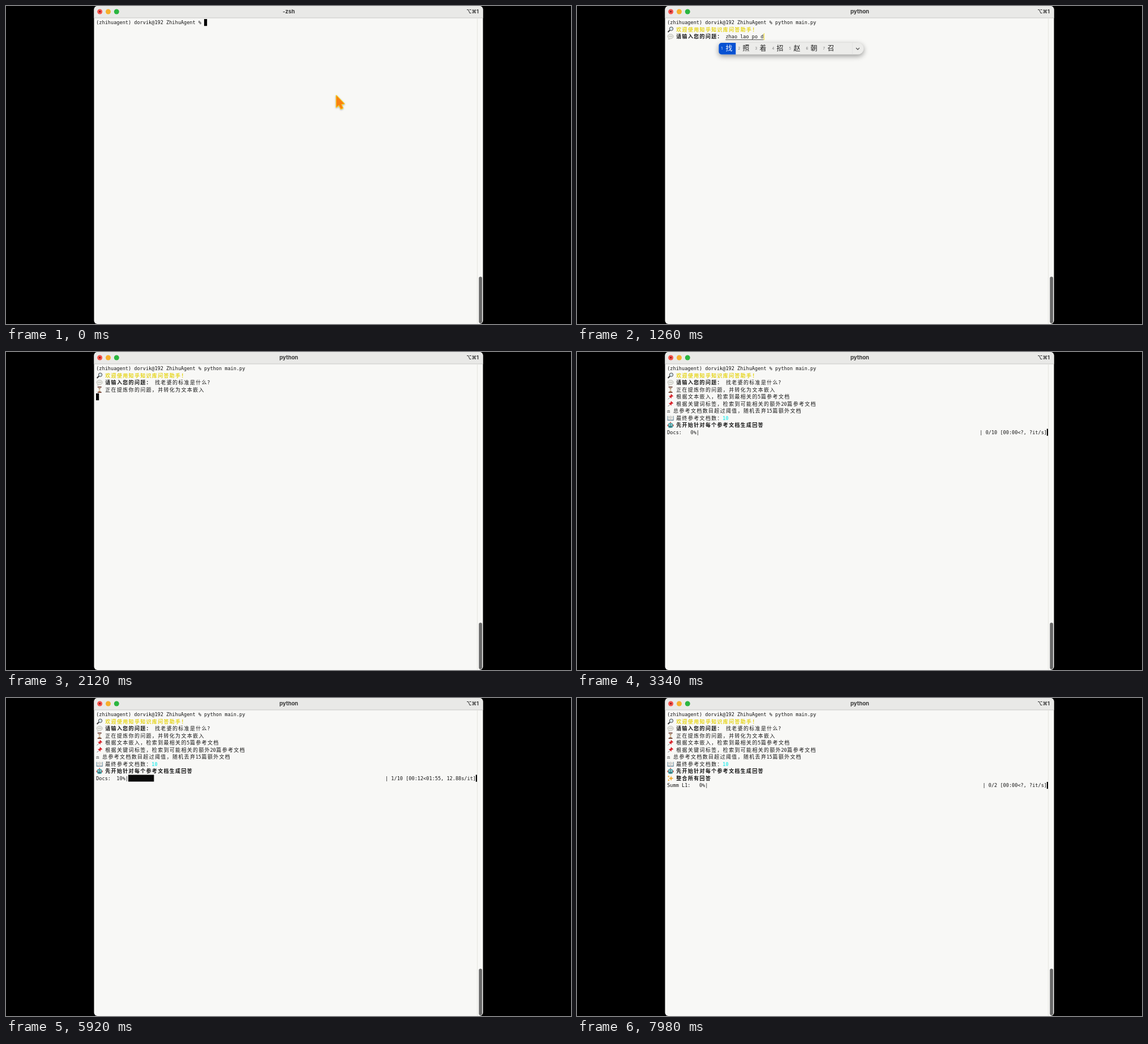
Write an HTML page with a canvas that moves like this. It is 998x561 px and loops after 8000 ms.

```html
<!DOCTYPE html>
<html lang="zh-CN">
<head>
<meta charset="utf-8">
<title>Terminal</title>
<style>
html, body { margin: 0; width: 100%; height: 100%; overflow: hidden; background: #000; }
canvas { display: block; }
</style>
</head>
<body>
<canvas id="stage" width="998" height="561"></canvas>
<script>
const ctx = document.getElementById('stage').getContext('2d');
const LOOP = 8000, LEFT = 159.2, CELL = 5.16, TOP = 29, ROW = 12.5, COLS = 130;
const MONO = '"DejaVu Sans Mono", monospace';
const CJK = '"Noto Sans CJK SC", "Noto Sans CJK", sans-serif';
const UI = 'Inter, "DejaVu Sans", sans-serif';
const INK = '#151515';

// Small pictures in an 11 x 11 box: colour, path, optional stroke width
const icons = {
  search: [['#333', 'M1 10L4.6 6.4', 2], ['#d5e5ec', 'M3.6 4.2a3.2 3.2 0 1 0 6.4 0a3.2 3.2 0 1 0-6.4 0'],
    ['#444', 'M3.6 4.2a3.2 3.2 0 1 0 6.4 0a3.2 3.2 0 1 0-6.4 0', 1]],
  bubble: [['#e9e9e4', 'M.6 5a5 4 0 1 1 5 4.1L2 10.4L2.4 8A4 4 0 0 1 .6 5'],
    ['#aaa99f', 'M.6 5a5 4 0 1 1 5 4.1L2 10.4L2.4 8A4 4 0 0 1 .6 5', .7], ['#8b8b86', 'M3 5h1M5.2 5h1M7.4 5h1', 1]],
  hourglass: [['#d9d4cc', 'M2.8 1h5.4C8.2 4 6.2 4.5 6.2 5.5S8.2 7 8.2 10H2.8C2.8 7 4.8 6.500 4.8 5.5S2.8 4 2.8 1'],
    ['#b98a55', 'M3.4 3h4.2L5.5 5.200zM3 9.800L5.5 7L8 9.800z'], ['#693329', 'M2 .8h7M2 10.2h7', 1.5]],
  pin: [['#777', 'M1 10L4.500 6.500', 1], ['#d8232b', 'M6.500 .4L10.600 4.400L9.500 5L8.300 5L7 6.700L7 8.800L2.200 4.100L4.300 4L6 2.700L5.900 1.400z']],
  book: [['#47708d', 'M0 1.800h11v8H0z'], ['#f1f0ea', 'M.8 1.200Q4 .6 5.500 2Q7 .6 10.200 1.200v7.500Q7 8 5.500 9.200Q4 8 .8 8.700z'],
    ['#8a8f92', 'M5.500 2v7M2 3.500h2.300M2 5.300h2.300M6.800 3.500h2.300M6.800 5.300h2.300', .6]],
  robot: [['#d44b45', 'M0 4.500h11v3H0zM4.600 0h1.800v2H4.600z'], ['#4ba0a5', 'M1.300 4Q1.500 1.800 5.500 1.800T9.700 4v4Q9.500 10.500 5.500 10.500T1.300 8z'],
    ['#e9f0ee', 'M2.800 4.300h1.700v1.700H2.800zM6.500 4.300h1.700v1.700H6.500z'], ['#294f55', 'M3.300 8.200h4.400', 1]],
  sparkles: [['#f3ac32', 'M6.500 1L7.600 4.500L11 5.800L7.600 7L6.500 10.500L5.400 7L2 5.800L5.400 4.500zM2.200 .3L2.800 1.800L4.300 2.400L2.800 3L2.200 4.500L1.600 3L.1 2.400L1.600 1.800zM2.200 7.200L3.700 9L2.200 10.800L.7 9z']],
};

// Lines printed below the question: time, icon, column, text, weight
const output = [
  [2020, 'hourglass', 3, '正在提炼你的问题，并转化为文本嵌入'],
  [2600, 'pin', 3, '根据文本嵌入，检索到最相关的5篇参考文档'],
  [2900, 'pin', 3, '根据关键词标签，检索到可能相关的额外20篇参考文档'],
  [2900, '', 0, '⚖ 总参考文档数目超过阈值，随机丢弃15篇额外文档'],
  [2900, 'book', 3, '最终参考文档数：'],
  [2900, 'robot', 3, '先开始针对每个参考文档生成回答', 'bold'],
  [7560, 'sparkles', 3, '整合所有回答', 'bold'],
];

// Input method phrases: first key, commit, spelling, result, candidates while typing, last candidates
const phrases = [
  [960, 1310, 'zhao lao po de', '找老婆的', '找 照 着 招 赵 朝 召', '找老婆的 找老婆 找老 找 照 着'],
  [1330, 1600, 'biao zhun', '标准', '标注 标柱 表注 表 标 飙 彪', '标准 表准 表 标 飙 彪'],
  [1660, 1940, 'shi shen me', '是什么', '是 时 事 使 市 十 式', '是什么 什么 是 时 事 使'],
];
const KEY = 25;

const colX = col => LEFT + col * CELL;
const rowY = row => TOP + row * ROW;
const isWide = ch => ch.charCodeAt(0) > 0x2e7f;

function rect(x, y, w, h, fill, radius = 0) {
  ctx.fillStyle = fill;
  ctx.beginPath();
  ctx.roundRect(x, y, w, h, radius);
  ctx.fill();
}

function label(text, x, y, font, fill, align = 'left') {
  ctx.font = font;
  ctx.fillStyle = fill;
  ctx.textAlign = align;
  ctx.fillText(text, x, y);
}

// Writes on the terminal grid and returns the next free column
function put(text, row, col, fill = INK, weight = '') {
  for (const ch of text) {
    const wide = isWide(ch);
    label(ch, colX(col) + (wide ? .6 : 0), rowY(row) + 3.1, `${weight} ${wide ? '9px ' + CJK : '8.57px ' + MONO}`, fill);
    col += wide ? 2 : 1;
  }
  return col;
}

function icon(name, row) {
  ctx.save();
  ctx.translate(159.7, rowY(row) - 5.5);
  for (const [colour, d, line] of icons[name] || []) {
    ctx.fillStyle = ctx.strokeStyle = colour;
    ctx.lineWidth = line || 1;
    ctx[line ? 'stroke' : 'fill'](new Path2D(d));
  }
  ctx.restore();
}

function caret(row, col) {
  const x = colX(col);
  rect(x - .2, rowY(row) - 6, Math.min(5.2, 832.2 - x), 12.2, '#000');
}

function windowFrame(title) {
  rect(0, 0, 998, 561, '#000');
  rect(155.5, 0, 687, 561, '#f8f8f6', 6);
  rect(155.5, 0, 687, 21, '#e9e9e7', [6, 6, 0, 0]);
  rect(155.5, 20.5, 687, 1, '#c9c9c7');
  rect(832, 21.5, 1, 539, '#e6e6e0');
  rect(835.3, 477.5, 5.7, 82, '#696969', 2.85);
  ['#f5544d', '#f6b02c', '#2bb640'].forEach((fill, i) => rect(161.2 + i * 14.8, 5.5, 9, 9, fill, 4.5));
  rect(164.3, 8.6, 2.8, 2.8, '#7c1513', 1.4);
  label(title, 499.5, 13.3, `bold 9.6px ${UI}`, '#383838', 'center');
  label('⌥⌘1', 835, 13, `bold 9px ${UI}`, '#383838', 'right');
}

function pointer() {
  const arrow = new Path2D('M583.5 158L583.5 178.500L588 174.700L591.500 181.500L595 180L592 173.200L597.500 172.500z');
  ctx.save();
  ctx.shadowColor = '#0005';
  ctx.shadowBlur = 3;
  ctx.shadowOffsetY = 1;
  ctx.lineJoin = 'round';
  ctx.lineWidth = 2;
  ctx.strokeStyle = '#f7dc25';
  ctx.stroke(arrow);
  ctx.restore();
  ctx.fillStyle = '#f98110';
  ctx.fill(arrow);
}

function candidates(words, x) {
  const slot = word => 18 + 12 * word.length;
  const width = words.reduce((sum, word) => sum + slot(word), 46);
  ctx.save();
  ctx.shadowColor = '#0006';
  ctx.shadowBlur = 10;
  ctx.shadowOffsetY = 3;
  rect(x, 65, width, 20.5, '#ececea', [5, 10, 10, 5]);
  ctx.restore();
  rect(x, 65, slot(words[0]), 20.5, '#0751d2', [5, 0, 0, 5]);
  rect(x + width - 20.5, 65, .7, 20.5, '#ddd');
  ctx.strokeStyle = '#444';
  ctx.lineWidth = 1.2;
  ctx.beginPath();
  ctx.moveTo(x + width - 13.5, 73.8);
  ctx.lineTo(x + width - 10.5, 76.8);
  ctx.lineTo(x + width - 7.5, 73.8);
  ctx.stroke();
  words.forEach((word, i) => {
    label(i + 1, x + 4, 77.3, `6px ${UI}`, i ? '#777' : '#fff');
    label(word, x + 12, 79.3, `12px ${CJK}`, i ? '#222' : '#fff');
    x += slot(word);
  });
}

function question(t) {
  icon('bubble', 2);
  put('请输入您的问题：', 2, 3, INK, 'bold');
  let col = 20;
  for (const [start, commit, spelling, result, early, late] of phrases) {
    if (t < start) break;
    if (t >= commit) {
      col = put(result, 2, col);
      continue;
    }
    const count = Math.min(spelling.length, 1 + Math.floor((t - start) / KEY));
    const x = colX(col), end = colX(put(spelling.slice(0, count).trim(), 2, col));
    rect(x, 59, end - x, .8, '#222');
    rect(end + .3, 48, 1.2, 12, '#f2df35');
    candidates((count < spelling.length ? early : late).split(' '), x - 12);
    return;
  }
  if (t >= 1960) col = put('?', 2, col);
  if (t < 2000) caret(2, col);
}

const clock = s => [s / 60, s % 60].map(v => String(Math.floor(v)).padStart(2, '0')).join(':');

function progress(name, row, done, total, seconds) {
  const rate = seconds / done;
  const timing = done ? `${clock(seconds)}<${clock(rate * (total - done))}, ${rate.toFixed(2)}s/it` : '00:00<?, ?it/s';
  const right = `| ${done}/${total} [${timing}]`;
  const start = put(`${name}: ${String(done / total * 100).padStart(3)}%|`, row, 0);
  const stop = COLS - right.length;
  if (done) rect(colX(start), rowY(row) - 6, (stop - start) * done / total * CELL, 12, '#0b0b0b');
  put(right, row, stop);
  caret(row, COLS);
}

function draw(t) {
  windowFrame(t < 400 ? '-zsh' : 'python');
  if (t < 120) pointer();

  const command = 'python main.py'.slice(0, Math.max(0, Math.ceil((t - 20) / 25)));
  const end = put('(zhihuagent) dorvik@192 ZhihuAgent % ' + command, 0, 0);
  if (t < 400) return caret(0, end);
  if (t < 720) return caret(1, 0);

  icon('search', 1);
  put('欢迎使用知乎知识库问答助手！', 1, 3, '#e6d51b', 'bold');
  output.forEach(([at, name, col, text, weight], i) => {
    if (t < at) return;
    icon(name, i + 3);
    const next = put(text, i + 3, col, INK, weight);
    if (name === 'book') put('10', i + 3, next, '#3cecec', 'bold');
  });
  question(t);

  if (t >= 7560) progress('Summ L1', 10, 0, 2, 0);
  else if (t >= 2900) {
    const done = t < 5600 ? 0 : t < 6460 ? 1 : Math.min(9, 2 + Math.floor((t - 6460) / 100));
    const seconds = 12.88 + Math.max(0, t - 6460) / 200;
    progress('Docs', 9, done, 10, seconds);
  } else if (t >= 2000) caret(t < 2020 ? 3 : t < 2600 ? 4 : 5, 0);
}

const began = performance.now();
function tick() {
  draw((performance.now() - began) % LOOP);
  requestAnimationFrame(tick);
}
tick();
</script>
</body>
</html>
```
